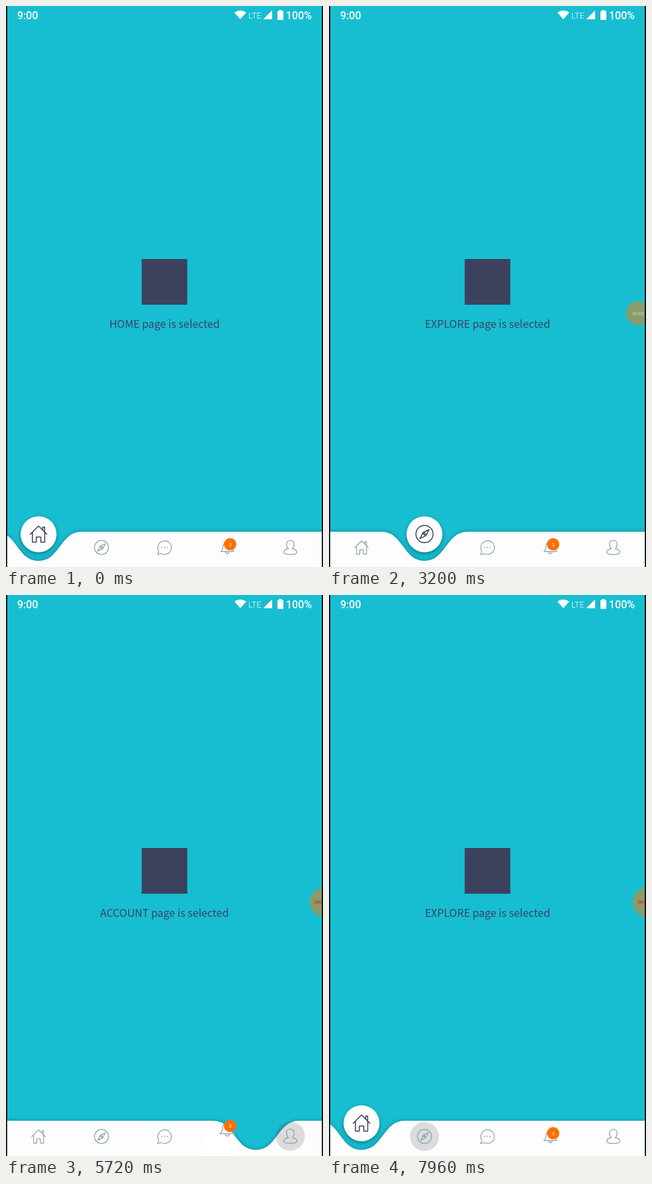
Animation, 480 px wide and 847 px high, one loop 8000 ms. Source, as an HTML page with a canvas:

```html
<!DOCTYPE html>
<html lang="en">
<head>
<meta charset="utf-8">
<title>Bottom navigation</title>
<style>
html, body { margin: 0; width: 100%; height: 100%; overflow: hidden; background: #000; }
canvas { display: block; width: 480px; height: 847px; }
</style>
</head>
<body>
<canvas id="stage"></canvas>
<script>
const W = 480, H = 847, LOOP = 8000, DP = 1.158;
const TEAL = '#17bed2', DARK = '#3c415e', GREY = '#90a4ae', WHITE = '#fdfdfd', ORANGE = '#ff6f00';
const PAGES = ['HOME', 'EXPLORE', 'MESSAGE', 'NOTIFICATION', 'ACCOUNT'];
const BAR_Y = 793.8, TRAVEL = 18 * DP, ICON_Y = 817.5;
const CLICK = 80, START = 118;
const ARROWS = [[560, 3100], [3980, 4980], [5980, 7100]];

const taps = [[2060, 1], [3560, 2], [4560, 3], [5520, 4], [6580, 0], [7880, 1]].map(([at, to], i, all) => {
  const from = i ? all[i - 1][1] : 0;
  return { at, to, from, steps: Math.abs(to - from), dur: Math.abs(to - from) * 100 + 150 };
});

const canvas = document.getElementById('stage');
const ctx = canvas.getContext('2d');
const ratio = window.devicePixelRatio || 1;
canvas.width = W * ratio;
canvas.height = H * ratio;

const clamp = v => Math.max(0, Math.min(1, v));
const lerp = (a, b, k) => a + (b - a) * k;
const span = (t, a, b) => clamp((t - a) / (b - a));
const cellX = i => 49.3 + 95.3 * i;

// cubic-bezier(.4, 0, .2, 1)
function ease(x) {
  x = clamp(x);
  let lo = 0, hi = 1;
  for (let n = 0; n < 18; n++) {
    const s = (lo + hi) / 2, r = 1 - s;
    if (1.2 * r * r * s + 0.6 * r * s * s + s * s * s < x) lo = s; else hi = s;
  }
  return x === 0 || x === 1 ? x : 3 * (1 - lo) * lo * lo + lo ** 3;
}

function disc(x, y, r, color) {
  ctx.beginPath();
  ctx.arc(x, y, r, 0, 7);
  ctx.fillStyle = color;
  ctx.fill();
}

function poly(points, color) {
  ctx.beginPath();
  points.forEach(([x, y]) => ctx.lineTo(x, y));
  ctx.closePath();
  ctx.fillStyle = color;
  ctx.fill();
}

function label(str, x, y, font, color, align = 'left') {
  ctx.font = font;
  ctx.textAlign = align;
  ctx.fillStyle = color;
  ctx.fillText(str, x, y);
}

function shadow(blur, dy, alpha) {
  ctx.shadowColor = `rgba(0,0,0,${alpha})`;
  ctx.shadowBlur = blur * ratio;
  ctx.shadowOffsetY = dy * ratio;
}

const ICONS = [
  'M-13 .8L0-12.2L13 .8M-9.3-2.8V12.3H-3.4V4.4H3.4V12.3H9.3V-2.8M6.3-6V-10.6H9.2V-3.2',
  'M13 0A13 13 0 1 1-13 0A13 13 0 1 1 13 0M6.8-6.8L2.3 2.3L-6.8 6.8L-2.3-2.3ZM1.4 0A1.4 1.4 0 1 1-1.4 0A1.4 1.4 0 1 1 1.4 0',
  'M-10.6 6.4A12.5 12.5 0 1 1-6.3 10.9Q-9 12.8-12.8 12.6Q-10.4 10-10.6 6.4',
  'M-12 7.5Q-8 4.5-8-2A8 8.5 0 0 1 8-2Q8 4.5 12 7.5ZM-3.2 8Q-3 11.5 0 11.5T3.2 8M-1.5-10.5A1.6 1.6 0 0 1 1.5-10.5',
  'M0-13C4.6-13 7-9.8 7-5.6C7-2.2 5 1.2 3.4 2.4C8 3.2 12.2 5.2 12.2 8.6C12.2 12 7 13 0 13S-12.2 12-12.2 8.6C-12.2 5.2-8 3.2-3.4 2.4C-5 1.2-7-2.2-7-5.6C-7-9.8-4.6-13 0-13Z'
].map(d => new Path2D(d));

function icon(i, x, y, scale, color) {
  ctx.save();
  ctx.translate(x, y);
  ctx.scale(scale, scale);
  ctx.strokeStyle = color;
  ctx.lineWidth = 1.5;
  ctx.lineJoin = 'round';
  ctx.stroke(ICONS[i]);
  if (i === 2) [-5, 0, 5].forEach(dx => disc(dx, 0, 1.1, color));
  ctx.restore();
}

function statusBar(t) {
  const font = '500 16px Roboto, sans-serif';
  label('9:00', 17, 20, font, '#fff');
  label('100%', 463, 20, font, '#fff', 'right');
  label('LTE', 367, 18.5, '300 12.5px Roboto, sans-serif', '#fff');
  ctx.beginPath();
  ctx.moveTo(354.8, 20);
  ctx.lineTo(345.8, 9.8);
  ctx.quadraticCurveTo(354.8, 3.6, 363.8, 9.8);
  ctx.closePath();
  ctx.fill();
  poly([[389.5, 20], [403, 20], [403, 6.5]], '#fff');
  ctx.beginPath();
  ctx.roundRect(411, 7.6, 9, 13.4, 1);
  ctx.rect(413.5, 6, 4, 2);
  ctx.fill();
  if (ARROWS.some(([a, b]) => t >= a && t < b)) {
    poly([[337.8, 11.5], [343.2, 11.5], [340.5, 6.5]], '#fff');
    poly([[337.8, 14], [343.2, 14], [340.5, 19]], '#fff');
  }
}

function content(t) {
  ctx.fillStyle = DARK;
  ctx.fillRect(205.5, 382, 69, 69);
  let page = 0;
  taps.forEach(p => { if (t >= p.at + CLICK) page = p.to; });
  label(PAGES[page] + ' page is selected', 240, 486,
    '16px "Noto Sans CJK SC", "Noto Sans CJK JP", "Noto Sans", sans-serif', DARK, 'center');
}

function bar(t) {
  let x = cellX(0), k = 0;
  taps.forEach(p => {
    const f = ease((t - p.at - START) / p.dur);
    if (t < p.at + START) return;
    x = lerp(cellX(p.from), cellX(p.to), f);
    k = p.steps > 1 ? 1 - Math.abs(1 - 2 * f) : 0;
  });
  const half = lerp(65, 42, k), mid = half / 2, dip = lerp(837.8, 775.5, k);
  ctx.save();
  shadow(6, 0, 0.3);
  ctx.beginPath();
  ctx.moveTo(-90, BAR_Y);
  ctx.lineTo(x - half, BAR_Y);
  ctx.bezierCurveTo(x - mid, BAR_Y, x - mid, dip, x, dip);
  ctx.bezierCurveTo(x + mid, dip, x + mid, BAR_Y, x + half, BAR_Y);
  ctx.lineTo(W + 90, BAR_Y);
  ctx.lineTo(W + 90, H + 20);
  ctx.lineTo(-90, H + 20);
  ctx.fillStyle = WHITE;
  ctx.fill();
  ctx.restore();
}

function cell(i, t) {
  let lift = i === 0 ? 1 : 0, side = 1, ripple = 0, radius = 22;
  taps.forEach(p => {
    const el = t - p.at - START;
    if (p.to === i) {
      const age = t - p.at;
      if (age >= 0) {
        ripple = span(age, -20, 60) * (1 - span(age, 210, 500));
        radius = lerp(12, 22, span(age, -20, 80));
      }
      if (el >= 0) {
        lift = ease((el - p.dur / 4) / p.dur);
        side = p.to > p.from ? -1 : 1;
      }
    } else if (p.from === i && el >= 0) lift = 1 - ease(el / 250);
  });

  const x = cellX(i), drop = 1 - lift, y = ICON_Y - TRAVEL * lift + 0.6 * lift;
  if (lift > 0) {
    ctx.save();
    if (lift > 0.7) shadow(6 * lift, 2.5 * lift, 0.36);
    disc(x + side * drop * 24 * DP, 797.6 + drop * 83, 27.2, '#fff');
    ctx.restore();
  }
  if (ripple > 0) disc(x, y, radius, `rgba(66,66,66,${0.18 * ripple})`);
  icon(i, x, y, lerp(0.82, 1, lift), lift === 1 ? DARK : GREY);
  if (i === 3) {
    disc(x + 4.2, y - 4.8, 9.4, ORANGE);
    label('3', x + 4.2, y - 2, '8px Roboto, sans-serif', '#fff', 'center');
  }
}

// Floating recorder button: slides in, dims, then tucks into the edge.
function recorder(t) {
  const enter = ease(span(t, 80, 420)), dim = ease(span(t, 1880, 2100)), tuck = ease(span(t, 4880, 5080));
  if (!enter) return;
  const x = lerp(503, 453.5, enter) + 14.5 * dim + 14 * tuck;
  const r = 22.3 - 4.3 * dim + 4 * tuck, y = 463.8;
  ctx.save();
  ctx.globalAlpha = lerp(1, 0.52, dim);
  if (dim < 1) shadow(3, 0, 0.35 * (1 - dim));
  disc(x, y, r, '#f57c0a');
  ctx.restore();
  if (tuck < 0.5) {
    const sec = Math.floor((t - 40) / 1000);
    label('00:0' + Math.max(0, sec), x, y + 3, lerp(8.5, 7, dim) + 'px Roboto, sans-serif',
      `rgba(255,255,255,${lerp(1, 0.65, dim)})`, 'center');
  } else {
    const red = '#cb4a28';
    disc(472.5, y, 2, red);
    ctx.strokeStyle = red;
    ctx.lineWidth = 1;
    [3.2, 4.8].forEach(q => [0, Math.PI].forEach(a => {
      ctx.beginPath();
      ctx.arc(472.5, y, q, a - 0.9, a + 0.9);
      ctx.stroke();
    }));
  }
}

function draw(t) {
  ctx.setTransform(ratio, 0, 0, ratio, 0, 0);
  ctx.fillStyle = '#000';
  ctx.fillRect(0, 0, W, H);
  ctx.save();
  ctx.beginPath();
  ctx.rect(1.8, 0, 476.4, H);
  ctx.clip();
  ctx.fillStyle = TEAL;
  ctx.fillRect(0, 0, W, H);
  statusBar(t);
  content(t);
  bar(t);
  PAGES.forEach((_, i) => cell(i, t));
  recorder(t);
  ctx.restore();
}

const begin = performance.now();
function tick() {
  draw((performance.now() - begin) % LOOP);
  requestAnimationFrame(tick);
}
tick();
</script>
</body>
</html>
```
